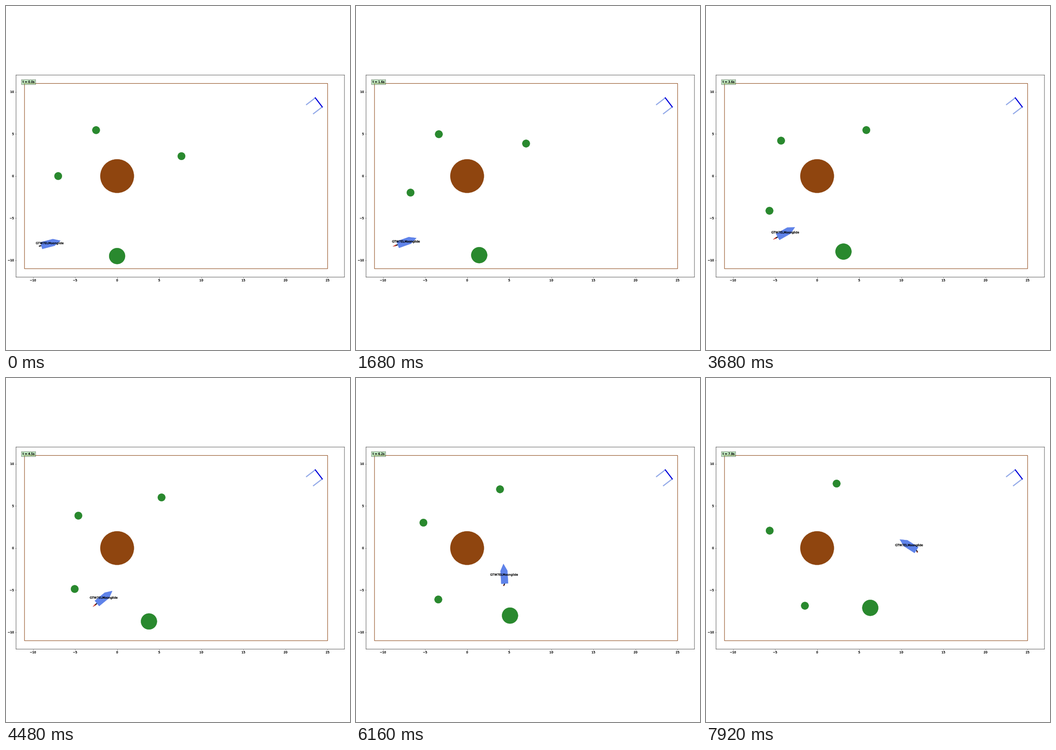
Animation of 748x748 px, one loop 8 s. Source, as a matplotlib script:

```python
import numpy as np
import matplotlib.pyplot as plt
from matplotlib import patheffects
from matplotlib.animation import FuncAnimation
from matplotlib.patches import Circle, Polygon, Rectangle

SIZE, DPI = 748, 46.75
FRAMES, INTERVAL = 100, 80
NAME = "GTW7ELMoonglide"
IGNITION, CUTOFF = 0.21, 5.9

plt.rcParams.update({
    "font.family": "DejaVu Sans",
    "font.size": 10,
    "text.hinting": "none",
    "axes.linewidth": 1.0,
})
CRISP = [patheffects.withStroke(linewidth=0.25, foreground="black")]

# Orbit radius, start angle, angular speed, body radius
SATELLITES = [
    (6.0, 2.0, 0.1, 0.45),
    (8.0, 0.3, 0.1237, 0.45),
    (7.0, np.pi, 0.1724, 0.45),
    (9.5, -np.pi / 2, 0.092, 0.95),
]


def sim_time(frame):
    """Playback runs at 0.08 s per frame over states logged every 0.05 s."""
    return (frame * 8 // 5) / 20


def smoothstep(t, start, end):
    s = np.clip((t - start) / (end - start), 0, 1)
    return s * s * (3 - 2 * s)


def burn(t, duration, steady, growing=0.0):
    """Distance covered while thrusting from rest, then coasting."""
    tau = max(t - IGNITION, 0)
    b = min(tau, duration)
    speed = 2 * steady * b + 4 * growing * b ** 3
    return steady * b ** 2 + growing * b ** 4 + speed * (tau - b)


def ship_pose(t):
    x = -8 + burn(t, 5.23, 0.3565)
    y = -8 + burn(t, 5.75, 0.0938, 0.001216)
    turn = 119 / (1 + np.exp(-1.35 * (t - 6.12)))
    return np.array([x, y]), np.radians(14.5 + 3 * t + turn)


def rotate(points, angle):
    c, s = np.cos(angle), np.sin(angle)
    return np.asarray(points) @ np.array([[c, s], [-s, c]])


fig = plt.figure(figsize=(SIZE / DPI, SIZE / DPI), dpi=DPI, facecolor="white")
ax = fig.add_axes([21.9 / SIZE, 158.5 / SIZE, 714.05 / SIZE, 439.4 / SIZE])
ax.set(xlim=(-12, 27), ylim=(-12, 12),
       xticks=range(-10, 26, 5), yticks=range(-10, 11, 5))
for spine in ax.spines.values():
    spine.set_snap(False)
for tick_label in ax.get_xticklabels() + ax.get_yticklabels():
    tick_label.set_path_effects(CRISP)

ax.add_patch(Rectangle((-11, -11), 36, 22, fill=False, snap=False,
                       edgecolor="saddlebrown", lw=1.6, zorder=2))
ax.add_patch(Circle((0, 0), 2, facecolor="#8f450f", edgecolor="saddlebrown",
                    lw=0.5, zorder=3))

# Docking bay: a front bar with two arms at right angles
bay = rotate([(-1.38, 0.68), (0, 0.68), (0, -0.68), (-1.38, -0.68)],
             np.radians(37.5)) + (23.95, 8.75)
for start, color in ((0, "#91a8e8"), (2, "#91a8e8"), (1, "#0000dc")):
    ax.plot(*bay[start:start + 2].T, color=color, lw=3.6, zorder=3,
            solid_capstyle="butt" if start != 1 else "projecting")

moons = [ax.add_patch(Circle((0, 0), body, facecolor="#29892e",
                             edgecolor="#1f7f24", lw=0.8, zorder=3))
         for *_, body in SATELLITES]


def ship_part(color, zorder, **style):
    return ax.add_patch(Polygon(np.zeros((3, 2)), closed=True, facecolor=color,
                                zorder=zorder, **style))


HULL = [(-1.03, -0.41), (-1.03, 0.41), (0.49, 0.41), (1.31, 0), (0.49, -0.41)]
NOZZLE = [(0, -0.065), (0.3, -0.065), (0.3, 0.065), (0, 0.065)]

nozzle = ship_part("#15151a", 5, edgecolor="none")
flame = ship_part("#dc3a2c", 6, edgecolor="#8a2a20", lw=0.4)
hull = ship_part("#5f83ea", 7, edgecolor="#4a6fe0", lw=0.6)
label = ax.text(0, 0, NAME, ha="center", va="center", zorder=8,
                path_effects=CRISP)
clock = ax.text(0.02, 0.965, "", transform=ax.transAxes, ha="left",
                va="center", zorder=9, path_effects=CRISP,
                bbox=dict(boxstyle="square,pad=0.39", lw=1, snap=False,
                          facecolor=(0.51, 0.82, 0.51, 0.5),
                          edgecolor=(0, 0, 0, 0.6)))


def draw(frame):
    t = sim_time(frame)
    for moon, (radius, phase, speed, _) in zip(moons, SATELLITES):
        angle = phase + speed * t
        moon.center = radius * np.cos(angle), radius * np.sin(angle)

    center, heading = ship_pose(t)
    hull.set_xy(rotate(HULL, heading) + center)
    label.set_position(center)

    # The engine hangs from the tail and swivels late in the turn
    tail = rotate([(-1.03, 0)], heading) + center
    aim = heading + np.pi - np.radians(32) * smoothstep(t, 4.9, 6.4)
    nozzle.set_xy(rotate(NOZZLE, aim) + tail)

    thrust = 0.34 if t < CUTOFF else 0.02
    flame.set_visible(t > IGNITION)
    flame.set_xy(rotate([(0.22, -0.09), (0.3 + thrust, 0), (0.22, 0.09)], aim)
                 + tail)

    clock.set_text(f"t = {t:.1f}s")
    return [*moons, nozzle, flame, hull, label, clock]


anim = FuncAnimation(fig, draw, frames=FRAMES, interval=INTERVAL,
                     repeat=True, repeat_delay=0, blit=False)
plt.show()
```
